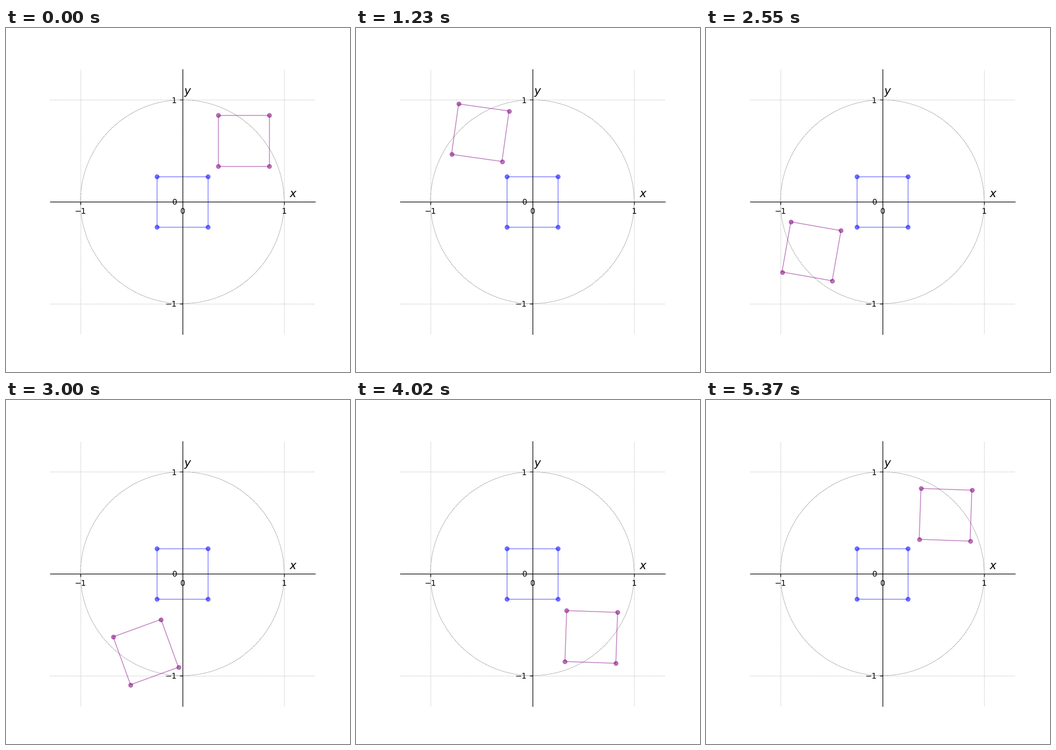
These frames come from a looping animation (600x600 px, 5.4 s). A matplotlib script:

```python
import numpy as np
import matplotlib.pyplot as plt
from matplotlib.animation import FuncAnimation

FRAMES = 180
SIZE = 600
STEP = 2 * np.pi / FRAMES

fig, ax = plt.subplots(figsize=(6, 6), dpi=100)
ax.set_aspect("equal")
ax.set(xlim=(-1.3, 1.3), ylim=(-1.3, 1.3),
       xticks=[-1, 0, 1], yticks=[-1, 0, 1])
ax.grid(ls=":", lw=0.8)
for side in ("left", "bottom"):
    ax.spines[side].set_position(("data", 0))
for side in ("right", "top"):
    ax.spines[side].set_visible(False)

for label, px, py in (("$x$", 500.7, 295), ("$y$", 317.3, 115.5)):
    fig.text(px / SIZE, 1 - py / SIZE, label, size=14,
             ha="center", va="baseline")

ax.add_patch(plt.Circle((0, 0), 1, fill=False, ec="black", ls=":", lw=0.5))

# closed unit-half square, one column per corner
square = 0.25 * np.array([[1, -1, -1, 1, 1],
                          [1, 1, -1, -1, 1]])
moved = square + 0.6


def outline(points, color):
    line, = ax.plot(*points[:, :4], "o", color=color, ms=5, alpha=0.5)
    edge, = ax.plot(*points, "-", color=color, lw=1, alpha=0.5)
    return line, edge


outline(square, "blue")
dots, edge = outline(moved, "purple")


def update(i):
    c, s = np.cos(i * STEP), np.sin(i * STEP)
    points = np.array([[c, -s], [s, c]]) @ moved
    dots.set_data(*points[:, :4])
    edge.set_data(*points)
    return dots, edge


anim = FuncAnimation(fig, update, frames=FRAMES, interval=30,
                     repeat=True, repeat_delay=0)
plt.show()
```
